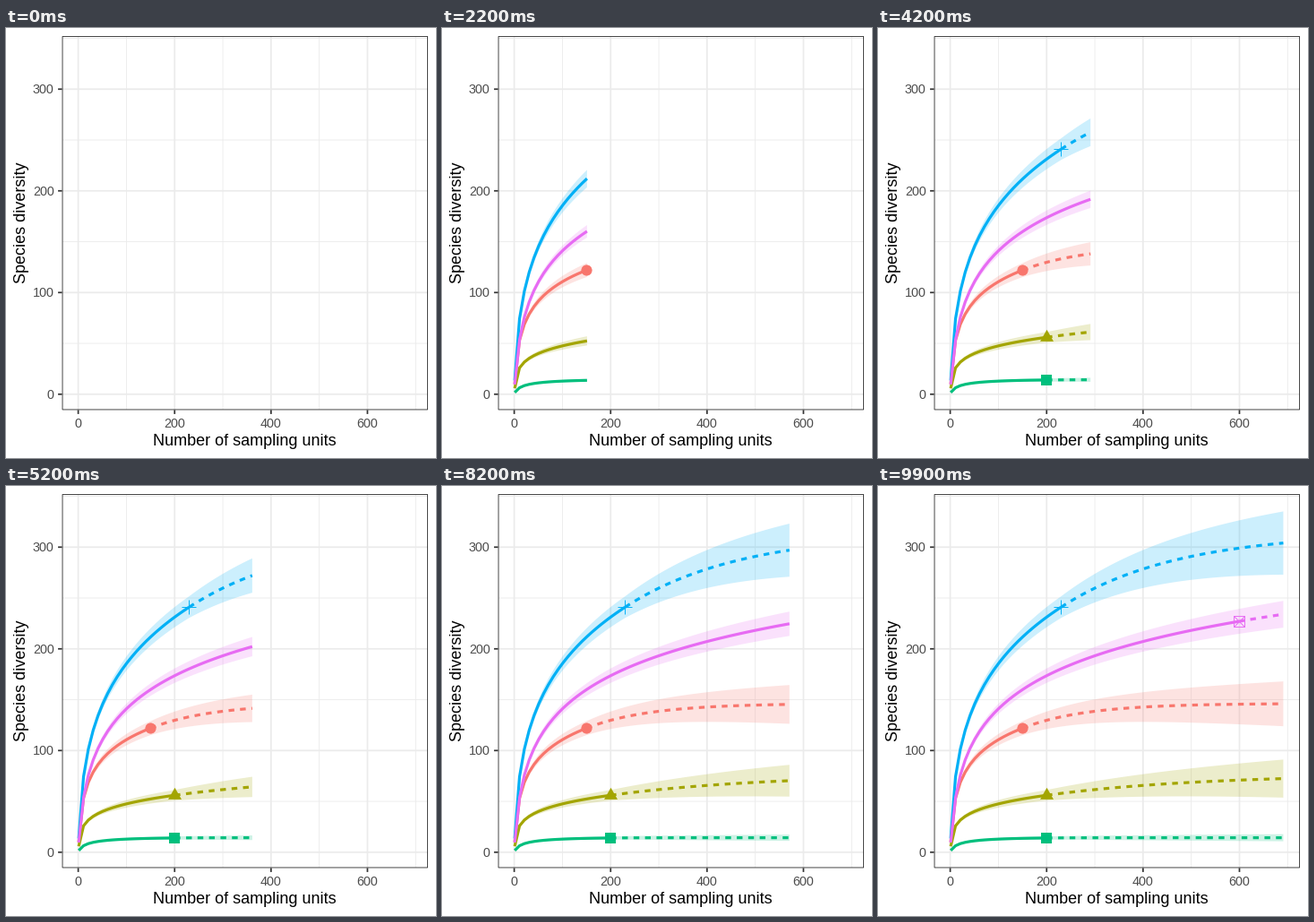
These frames come from a looping animation (480x480 px, 10 s). A matplotlib script:

```python
import numpy as np
import matplotlib.pyplot as plt
from matplotlib.animation import FuncAnimation
from matplotlib.patches import Rectangle

plt.rcParams["font.family"] = "Liberation Sans"

SIZE, FRAMES = 480, 100
LEFT, RIGHT, TOP, BOTTOM = 62.6, 471, 9, 426.4
X_LIM, Y_LIM = (-33.5, 725.5), (-15.5, 352.2)
FIRST, LAST, STEP = 1, 691, 10

# 72 dpi, so one point is one pixel
fig = plt.figure(figsize=(SIZE / 72, SIZE / 72), dpi=72, facecolor="white")
ax = fig.add_axes([LEFT / SIZE, 1 - BOTTOM / SIZE,
                   (RIGHT - LEFT) / SIZE, (BOTTOM - TOP) / SIZE])
ax.set(xlim=X_LIM, ylim=Y_LIM)
ax.axis("off")


def to_px(x, y):
    """Data position to stage pixels, y downwards."""
    px = LEFT + (x - X_LIM[0]) / (X_LIM[1] - X_LIM[0]) * (RIGHT - LEFT)
    py = BOTTOM - (y - Y_LIM[0]) / (Y_LIM[1] - Y_LIM[0]) * (BOTTOM - TOP)
    return px, py


def label(x, y, text, size, color, **kw):
    fig.text(x / SIZE, 1 - y / SIZE, text, fontsize=size, color=color,
             va="baseline", rotation_mode="anchor", **kw)


def tick(xs, ys):
    line = plt.Line2D(np.array(xs) / SIZE, 1 - np.array(ys) / SIZE, lw=1.74,
                      color="#333333", solid_capstyle="butt", snap=False)
    fig.add_artist(line)


def draw_frame():
    grid = dict(color="#EBEBEB", snap=False, solid_capstyle="butt")
    for x in range(100, 701, 200):
        ax.axvline(x, lw=0.87, zorder=0, **grid)
    for y in range(50, 351, 100):
        ax.axhline(y, lw=0.87, zorder=0, **grid)
    for x in range(0, 601, 200):
        ax.axvline(x, lw=1.74, zorder=0.5, **grid)
        px, _ = to_px(x, 0)
        tick([px, px], [BOTTOM, BOTTOM + 4.5])
        label(px, 445.6, str(x), 14.4, "#4D4D4D", ha="center")
    for y in range(0, 301, 100):
        ax.axhline(y, lw=1.74, zorder=0.5, **grid)
        _, py = to_px(0, y)
        tick([LEFT - 4.5, LEFT], [py, py])
        label(53.6, py + 5.2, str(y), 14.4, "#4D4D4D", ha="right")

    inset = 0.44
    fig.add_artist(Rectangle(
        ((LEFT + inset) / SIZE, 1 - (BOTTOM - inset) / SIZE),
        (RIGHT - LEFT - 2 * inset) / SIZE, (BOTTOM - TOP - 2 * inset) / SIZE,
        transform=fig.transFigure, fill=False, lw=0.9, ec="#333333",
        snap=False, zorder=10))

    label((LEFT + RIGHT) / 2, 466.2, "Number of sampling units", 18, "black",
          ha="center")
    label(22, (TOP + BOTTOM) / 2 - 0.8, "Species diversity", 18, "black",
          ha="center", rotation=90)


def hermite(t, y0, y1, d0, d1):
    """Cubic from y0 to y1 over t = 0..1 with end slopes d0 and d1."""
    return (y0 + (y1 - y0) * t * t * (3 - 2 * t)
            + d0 * t * (1 - t) ** 2 + d1 * t * t * (t - 1))


def richness(m, ref, count, once, twice, start, rise):
    """Interpolated in log(m) up to ref, then extrapolated to an asymptote."""
    span = np.log(ref)
    t = np.minimum(np.log(m) / span, 1)
    unseen = (ref - 1) / ref * once ** 2 / (2 * twice)
    decay = 1 - once / (ref * unseen + once)
    extra = unseen * (1 - decay ** np.maximum(m - ref, 0))
    return hermite(t, start, count, rise * span, once * span) + extra


class Series:
    """Accumulation curve: solid up to `ref` samples, dashed beyond."""

    def __init__(self, color, z, markers, ref, count, once, twice,
                 start, rise, spread, widen):
        self.ref = ref
        m = np.unique(np.append(np.arange(FIRST, LAST + 1, STEP), ref))
        self.m = m
        self.when = np.round((FRAMES - 1) * (m - FIRST) / (LAST - FIRST))
        self.s = richness(m, ref, count, once, twice, start, rise)
        self.half = spread * np.sqrt(m) + widen * np.maximum(m - ref, 0)

        self.ribbon, = ax.fill([0], [0], color=color, alpha=0.2, lw=0, zorder=1)
        style = dict(color=color, lw=3.2, zorder=z, solid_joinstyle="round",
                     solid_capstyle="butt", dash_capstyle="butt")
        self.solid, = ax.plot([], [], **style)
        self.dashed, = ax.plot([], [], ls=(0, (2, 2)), **style)
        self.points = [ax.plot(ref, count, ls="", color=color, zorder=z + 0.1,
                               **mk)[0] for mk in markers]

    def front(self, i):
        """Sample size reached at step i, linear between the knots."""
        k = np.searchsorted(self.when, i, side="right") - 1
        if k == len(self.m) - 1:
            return self.m[k]
        part = (i - self.when[k]) / (self.when[k + 1] - self.when[k])
        return self.m[k] + part * (self.m[k + 1] - self.m[k])

    def update(self, i):
        end = self.front(i)
        m = np.append(self.m[self.m < end], end)
        s = np.interp(m, self.m, self.s)
        half = np.interp(m, self.m, self.half)
        before, after = m <= self.ref, m >= self.ref
        self.solid.set_data(m[before], s[before])
        self.dashed.set_data(m[after], s[after])
        self.ribbon.set_xy(np.column_stack([
            np.append(m, m[::-1]), np.append(s + half, (s - half)[::-1])]))
        for p in self.points:
            p.set_visible(end >= self.ref)


TRIANGLE = [(0, 8.7), (7.5, -4.35), (-7.5, -4.35), (0, 8.7)]
CIRCLE = [dict(marker="o", ms=11.2, mew=0.9)]
WEDGE = [dict(marker=TRIANGLE, ms=17.4, mew=0)]
SQUARE = [dict(marker="s", ms=11.2, mew=0)]
PLUS = [dict(marker="+", ms=16, mew=0.95)]
CROSSED_BOX = [dict(marker="s", ms=11.2, mew=0.95, mfc="none"),
               dict(marker="x", ms=11.2, mew=0.95)]

draw_frame()
series = [
    Series("#F8766D", 2, CIRCLE, ref=150, count=122, once=28, twice=16,
           start=10, rise=11.3, spread=0.56, widen=0.0135),
    Series("#A3A500", 3, WEDGE, ref=200, count=56, once=13, twice=4,
           start=5.8, rise=8.8, spread=0.37, widen=0.0183),
    Series("#00BF7D", 4, SQUARE, ref=200, count=14, once=1, twice=2,
           start=1.7, rise=0, spread=0.11, widen=0.0012),
    Series("#00B0F6", 5, PLUS, ref=230, count=241, once=71, twice=34,
           start=13.5, rise=12, spread=0.7, widen=0.0275),
    Series("#E76BF3", 6, CROSSED_BOX, ref=599, count=227, once=49, twice=23,
           start=9.6, rise=3, spread=0.5, widen=0),
]


def update(i):
    for s in series:
        s.update(i)
    return []


anim = FuncAnimation(fig, update, frames=FRAMES, interval=100,
                     init_func=lambda: update(0), repeat=True, repeat_delay=0)
plt.show()
```
